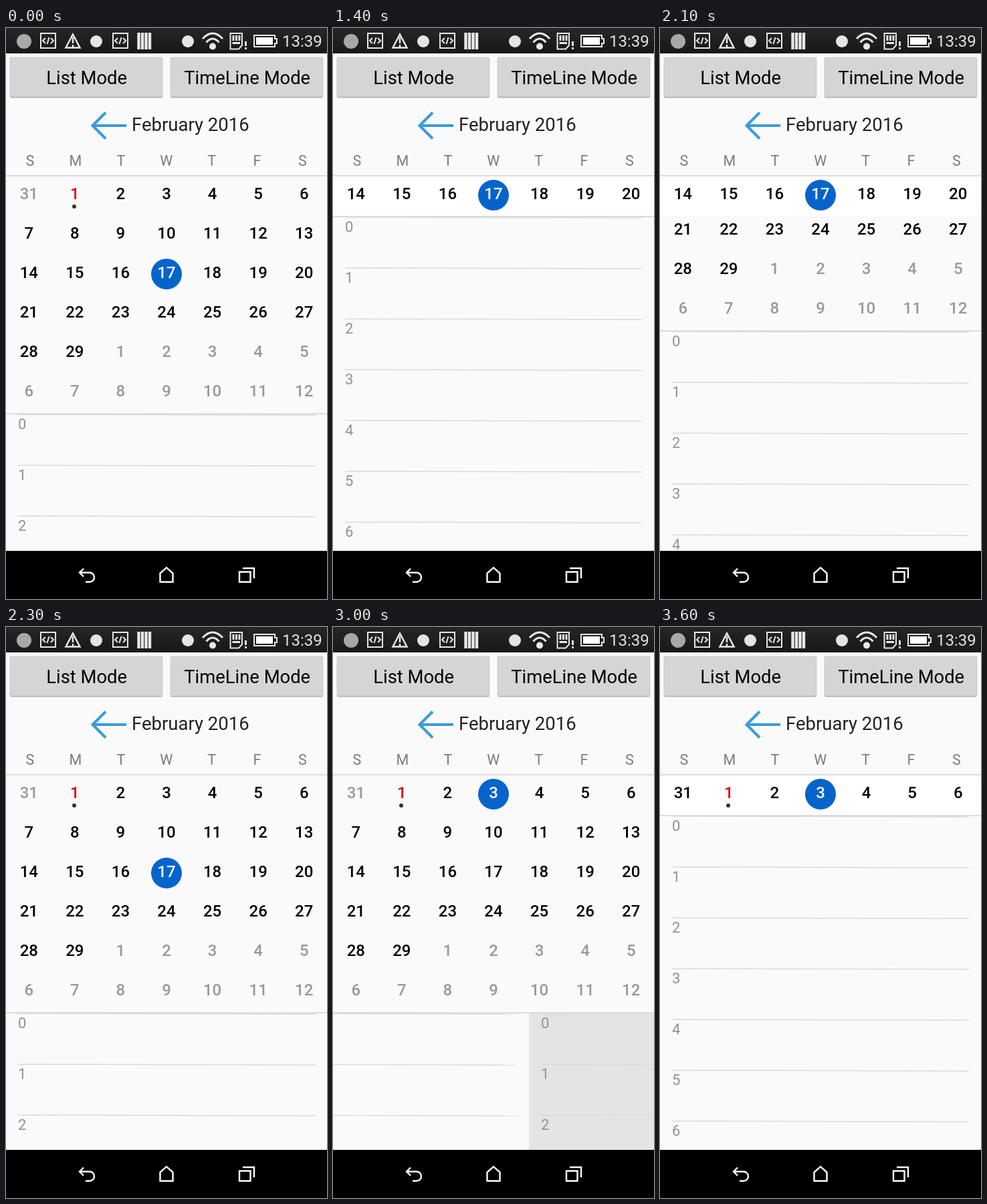
Animation of 480x854 px, one loop 3700 ms. Source, as an HTML page:

```html
<!DOCTYPE html>
<html lang="en">
<head>
<meta charset="utf-8">
<title>Calendar</title>
<style>
  html, body { margin: 0; width: 100%; height: 100%; overflow: hidden; background: #fafafa; }
  svg { display: block; width: 100vw; height: 100vh; font-family: Roboto, sans-serif; }
  .mid { text-anchor: middle; }
  .day { font-size: 24px; font-weight: 500; text-anchor: middle; }
  .hour { font-size: 22px; fill: #929292; }
  .line { stroke: #dadada; stroke-width: 1.4; }
  .icon { fill: none; stroke: #e8e8e8; stroke-width: 2; }
  .bold { stroke-width: 3; }
  .nav { fill: none; stroke: #fff; stroke-width: 2.4; }
</style>
</head>
<body>
<svg id="stage" viewBox="0 0 480 854">
  <defs>
    <linearGradient id="bar" x2="0" y2="1">
      <stop stop-color="#262626"/><stop offset="1" stop-color="#181818"/>
    </linearGradient>
    <clipPath id="hourClip"><rect id="hourWindow" width="480" y="570" height="212"/></clipPath>
    <g id="codeIcon">
      <rect class="icon" x="1" y="1" width="22" height="22"/>
      <path class="icon" d="M8 8L4 12L8 16M16 8L20 12L16 16M13.500 7L10.500 17"/>
    </g>
  </defs>

  <rect width="480" height="854" fill="#fafafa"/>
  <g id="month"></g>
  <g id="pinned"></g>

  <g id="header">
    <rect y="37" width="480" height="184" fill="#fafafa"/>
    <path d="M180 146H131M149 126.500L129.500 146L149 165.500" fill="none" stroke="#3a9bdc" stroke-width="4"/>
    <text x="188" y="154" font-size="27.500" fill="#222">February 2016</text>
    <path d="M0 221H480" stroke="#dcdcdc" stroke-width="2"/>
  </g>

  <g id="hours">
    <rect id="hoursBack" width="480" height="300" fill="#fafafa"/>
    <g clip-path="url(#hourClip)">
      <g id="oldPage"></g>
      <g id="newPage"></g>
    </g>
    <path id="divider" d="M0 0H480" stroke="#dcdcdc" stroke-width="2"/>
  </g>

  <g id="status">
    <rect width="480" height="38" fill="url(#bar)"/>
    <circle cx="27" cy="20" r="11" fill="#a8a8a8"/>
    <use href="#codeIcon" x="51" y="7"/>
    <path class="icon" style="stroke-width:2.500" d="M100 9.500L110.500 29.500H89.500ZM100 14V23M100 25V29"/>
    <circle cx="135" cy="20" r="9" fill="#e4e4e4"/>
    <use href="#codeIcon" x="159" y="7"/>
    <path d="M198.500 7V32M204 7V32M209.500 7V32M215 7V32" stroke="#e8e8e8" stroke-width="4.400"/>
    <circle cx="272" cy="20" r="9" fill="#e4e4e4"/>
    <path class="icon bold" d="M294 16Q309 0 324 16M299.500 21.500Q309 10.500 318.500 21.500"/>
    <circle cx="309" cy="27.500" r="5" fill="#e8e8e8"/>
    <path class="icon" d="M335.500 8H353V26L348 31.500H335.500Z"/>
    <path class="icon bold" d="M340 11V19M344.500 11V19M349 11V19M338.500 22.500H350M358.500 20V27M358.500 29V32"/>
    <path class="icon" d="M371 11H402V16H405V23H402V28H371Z"/>
    <rect x="374" y="14" width="25" height="11" fill="#fff"/>
    <text x="413" y="28" font-size="24" fill="#e2e2e2">13:39</text>
  </g>

  <g id="navigation">
    <rect y="782" width="480" height="72" fill="#000"/>
    <path class="nav" d="M116 808.500L110 814.500L116 820.500M110 814.500H125A7 7 0 0 1 125 828.500H119"/>
    <path class="nav" d="M230.500 828.500V815.500L240 807L249.500 815.500V828.500Z"/>
    <path class="nav" d="M349 813.500H365.500V828.500H349ZM354 808H371V823"/>
  </g>
</svg>
<script>
const LOOP = 3700, STEP = 100;
const ROW = 59, COLUMN = 480 / 7, HOUR = 76;
const MONTH_END = 577, FOLD = 5 * ROW, BOTTOM = 782;
const $ = id => document.getElementById(id);

function add(parent, tag, attrs, text) {
  const node = document.createElementNS("http://www.w3.org/2000/svg", tag);
  for (const key in attrs) node.setAttribute(key, attrs[key]);
  if (text !== undefined) node.textContent = text;
  return parent.appendChild(node);
}

function addButton(x, label) {
  const header = $("header");
  add(header, "rect", { x, y: 45, width: 228, height: 59.5, rx: 2, fill: "#a6a6a6" });
  add(header, "rect", { x, y: 44, width: 228, height: 59, rx: 2, fill: "#d5d5d5", stroke: "#c6c6c6", "stroke-width": 0.8 });
  add(header, "text", { x: x + 114.7, y: 84, class: "mid", "font-size": 27.4 }, label);
}

// A week starts at January 31; selected is a cell index or -1.
function addWeek(parent, row, selected, allBlack) {
  const week = add(parent, "g", { transform: `translate(0 ${row * ROW})` });
  for (let col = 0; col < 7; col++) {
    const cell = row * 7 + col;
    const inMonth = cell >= 1 && cell <= 29;
    const day = cell === 0 ? 31 : inMonth ? cell : cell - 29;
    const x = COLUMN * (col + 0.5);
    let fill = inMonth || allBlack ? "#000" : "#999";
    if (cell === 1) {
      fill = "#e8000c";
      add(week, "circle", { cx: 102, cy: 267, r: 3, fill: "#333" });
    }
    if (cell === selected) {
      fill = "#fff";
      add(week, "circle", { cx: 240, cy: 250, r: 23, fill: "#0564cc" });
    }
    add(week, "text", { x, y: 256, class: "day", fill }, day);
  }
}

function buildSelection(selected) {
  const month = add($("month"), "g");
  for (let row = 0; row < 6; row++) addWeek(month, row, selected);
  const row = Math.floor(selected / 7);
  const pinned = add($("pinned"), "g");
  add(pinned, "rect", { y: 222, width: 480, height: 59, fill: "#fff" });
  addWeek(add(pinned, "g", { transform: `translate(0 ${-row * ROW})` }), row, selected, true);
  return { month, pinned, row };
}

function buildPage(page, color) {
  const back = add(page, "rect", { width: 480, height: 520, fill: color });
  for (let hour = 0; hour < 8; hour++) {
    const y = hour * HOUR + 1;
    add(page, "path", { class: "line", d: `M18 ${y}L462 ${y + 1}` });
    add(page, "text", { class: "hour", x: 18, y: y + 22 }, hour);
  }
  return back;
}

const lerp = (time, start, end, from, to) =>
  from + (to - from) * Math.min(1, Math.max(0, (time - start) / (end - start)));

function foldAt(time) {
  if (time < 1000) return 0;
  if (time < 1900) return lerp(time, 1000, 1400, 57, FOLD);
  if (time < 3300) return lerp(time, 1900, 2300, 248, 0);
  return lerp(time, 3300, 3600, 52, FOLD);
}

// Accelerates, then decelerates.
const slideAt = time => 240 * (1 - Math.cos(Math.PI * lerp(time, 2800, 3266, 0, 1)));

const show = (node, visible) => node.setAttribute("display", visible ? "inline" : "none");
const move = (node, x, y) => node.setAttribute("transform", `translate(${x} ${y})`);

addButton(6, "List Mode");
addButton(246, "TimeLine Mode");
[..."SMTWTFS"].forEach((letter, i) =>
  add($("header"), "text", { x: 36 + 67.9 * i, y: 205.5, class: "mid", "font-size": 21.5, fill: "#7c7c7c" }, letter));
const selections = [buildSelection(17), buildSelection(3)];
buildPage($("oldPage"), "#fafafa");
const newBack = buildPage($("newPage"), "#e4e4e4");

function draw(time) {
  const fold = foldAt(time), slide = slideAt(time);
  const top = MONTH_END - fold;
  const active = time < 2800 ? 0 : 1;
  selections.forEach(({ month, pinned, row }, i) => {
    move(month, 0, -fold);
    show(month, i === active);
    show(pinned, i === active && fold > 0 && fold >= row * ROW);
  });

  // While folding up, the hour list keeps its height until it settles.
  const folding = fold < FOLD && (time < 1900 || time >= 3300);
  const end = folding ? BOTTOM - fold : BOTTOM;
  $("hourWindow").setAttribute("y", top);
  $("hourWindow").setAttribute("height", end - top);
  $("hoursBack").setAttribute("y", top);
  $("hoursBack").setAttribute("height", BOTTOM - top);
  move($("divider"), 0, top);
  move($("oldPage"), -slide, top);
  move($("newPage"), 480 - slide, top);
  show($("newPage"), slide > 0);
  newBack.setAttribute("fill", time < 3300 ? "#e4e4e4" : "#fafafa");
}

const began = performance.now();
function tick() {
  const time = (performance.now() - began) % LOOP;
  draw(Math.floor(time / STEP) * STEP);
  requestAnimationFrame(tick);
}
tick();
</script>
</body>
</html>
```
